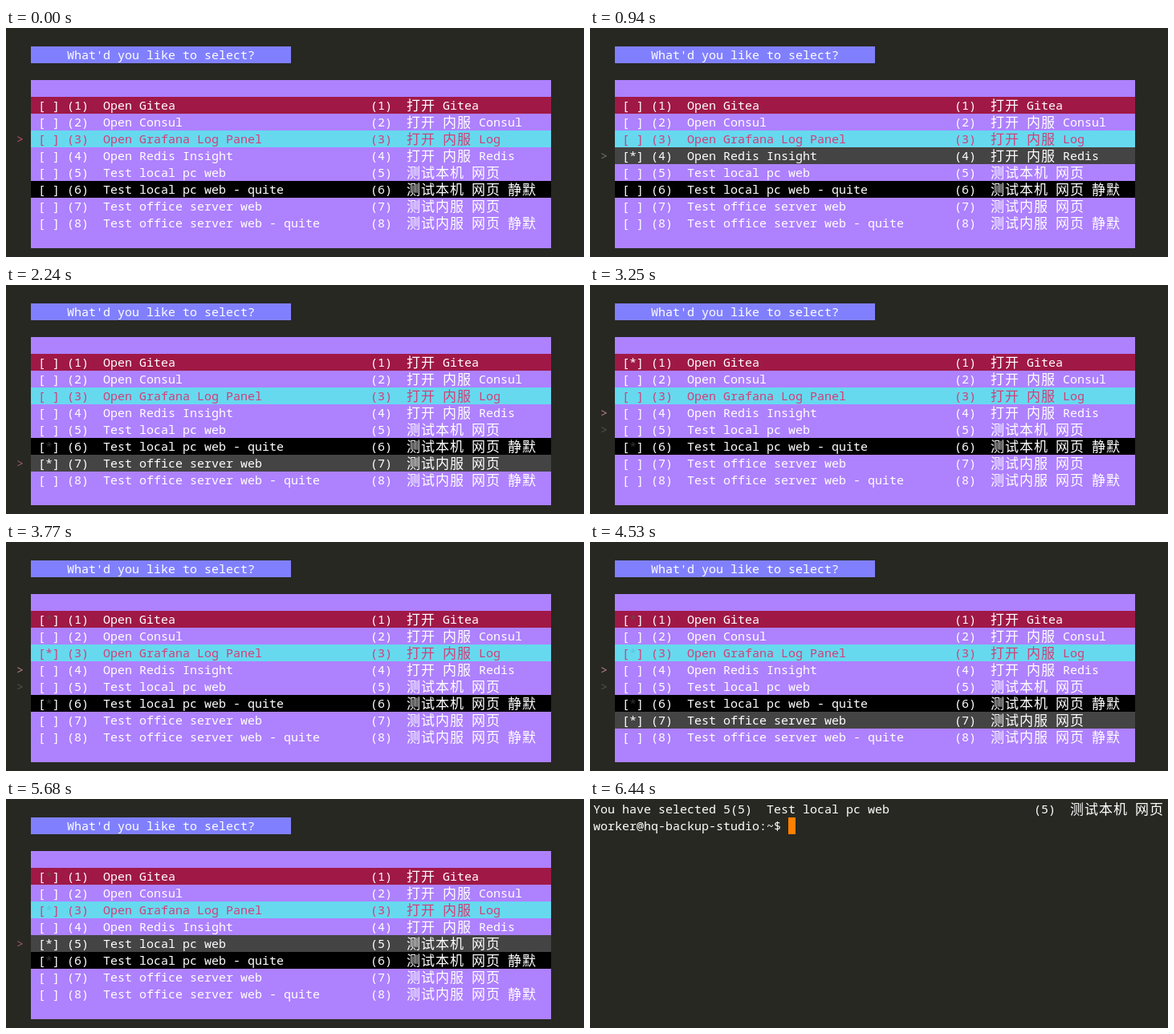
These frames come from a looping animation (720x286 px, 8 s). An HTML page:

```html
<!DOCTYPE html>
<html lang="en">
<head>
<meta charset="utf-8">
<title>Terminal menu</title>
<style>
html, body { margin: 0; height: 100%; overflow: hidden; background: #272822; }
svg { display: block; }
text { font: 500 15px "Noto Sans Mono", monospace; white-space: pre; }
.cjk {
  font: 17px "Noto Sans CJK SC", "Noto Sans CJK", sans-serif;
  letter-spacing: 1px;
  baseline-shift: -1px;
}
</style>
</head>
<body>
<svg id="screen" width="720" height="286" viewBox="0 0 720 286"></svg>
<script>
const LOOP = 8000, DONE = 6440;
const COL = 9, LINE = 21, LEFT = 31, TOP = 65, WIDTH = 648;

const items = [
  ['Open Gitea', '打开 Gitea'],
  ['Open Consul', '打开 内服 Consul'],
  ['Open Grafana Log Panel', '打开 内服 Log'],
  ['Open Redis Insight', '打开 内服 Redis'],
  ['Test local pc web', '测试本机 网页'],
  ['Test local pc web - quite', '测试本机 网页 静默'],
  ['Test office server web', '测试内服 网页'],
  ['Test office server web - quite', '测试内服 网页 静默'],
];

// Rows with their own colours keep a faint star once deselected.
const styles = {
  1: { bg: '#a01846', fg: '#fff', stale: '#704644' },
  3: { bg: '#66d9ef', fg: '#d33f78', stale: '#5bc6df' },
  6: { bg: '#000', fg: '#fff', stale: '#333' },
};

const PINK = '#c4506c', GREY = '#74746e', ROSE = '#a05c66', PALE = '#b88086', FAINT = '#52524c';

// time, selected row, cursor row, cursor colour
const steps = [
  [0, 0, 3, PINK],
  [500, 0, 4, GREY],
  [940, 4, 4, GREY],
  [1180, 4, 5, ROSE],
  [1320, 5, 5, ROSE],
  [1480, 5, 6, ROSE],
  [1700, 6, 6, ROSE],
  [2090, 6, 7, ROSE],
  [2240, 7, 7, ROSE],
  [2460, 7, 6, PALE],
  [2630, 7, 5, PALE],
  [2850, 4, 4, PALE],
  [3250, 1, 4, PALE],
  [3550, 2, 4, PALE],
  [3770, 3, 4, PALE],
  [4140, 5, 4, PALE],
  [4530, 7, 4, PALE],
  [5220, 4, 4, PALE],
  [5540, 4, 5, ROSE],
  [5680, 5, 5, ROSE],
];

const rect = (x, y, w, h, fill) =>
  `<rect x="${x}" y="${y}" width="${w}" height="${h}" fill="${fill}"/>`;

const text = (x, y, str, fill = '#fff') =>
  `<text x="${x}" y="${y + 16}" fill="${fill}">` +
  str.replace(/[\u4e00-\u9fff]+/g, '<tspan class="cjk">$&</tspan>') + '</text>';

const rowY = n => TOP + n * LINE;

function row(n, selected, visited) {
  const style = styles[n], y = rowY(n), on = n === selected;
  const [en, zh] = items[n - 1];
  const fg = style ? style.fg : '#fff';
  const at = (col, str, fill = fg) => text(LEFT + col * COL, y, str, fill);
  let out = '';
  if (style || on) out += rect(LEFT, y, WIDTH, LINE, style ? style.bg : '#444');
  if (on) out += at(2, '*');
  else if (style && visited.has(n)) out += at(2, '*', style.stale);
  return out + at(1, '[') + at(3, ']') + at(5, `(${n})  ${en}`) +
    at(47, `(${n})`) + at(52, zh);
}

function menu(index) {
  const [time, selected, cursor, colour] = steps[index];
  const visited = new Set(steps.slice(0, index).map(s => s[1]));
  const pointer = (n, fill) => text(LEFT - 2 * COL, rowY(n), '&gt;', fill);
  let out = rect(LEFT, 23, 324, LINE, '#8080ff') +
    text(LEFT + 5 * COL, 23, "What'd you like to select?") +
    rect(LEFT, TOP, WIDTH, 10 * LINE, '#ae81ff');
  items.forEach((_, i) => out += row(i + 1, selected, visited));
  if (time >= 2850 && time < 5540) out += pointer(5, FAINT);
  return out + pointer(cursor, colour);
}

function shell() {
  const [en, zh] = items[4];
  return text(4, 2, `You have selected 5(5)  ${en}`) +
    text(4 + 61 * COL, 2, '(5)') + text(4 + 66 * COL, 2, zh) +
    text(4, 23, 'worker@hq-backup-studio:~$') +
    rect(4 + 27 * COL, 23, COL, LINE, '#ff8000');
}

const screen = document.getElementById('screen');
let shown;

function draw() {
  const t = performance.now() % LOOP;
  const state = t >= DONE ? -1 : steps.findLastIndex(s => s[0] <= t);
  if (state !== shown) {
    screen.innerHTML = state < 0 ? shell() : menu(state);
    shown = state;
  }
  requestAnimationFrame(draw);
}
draw();
</script>
</body>
</html>
```
